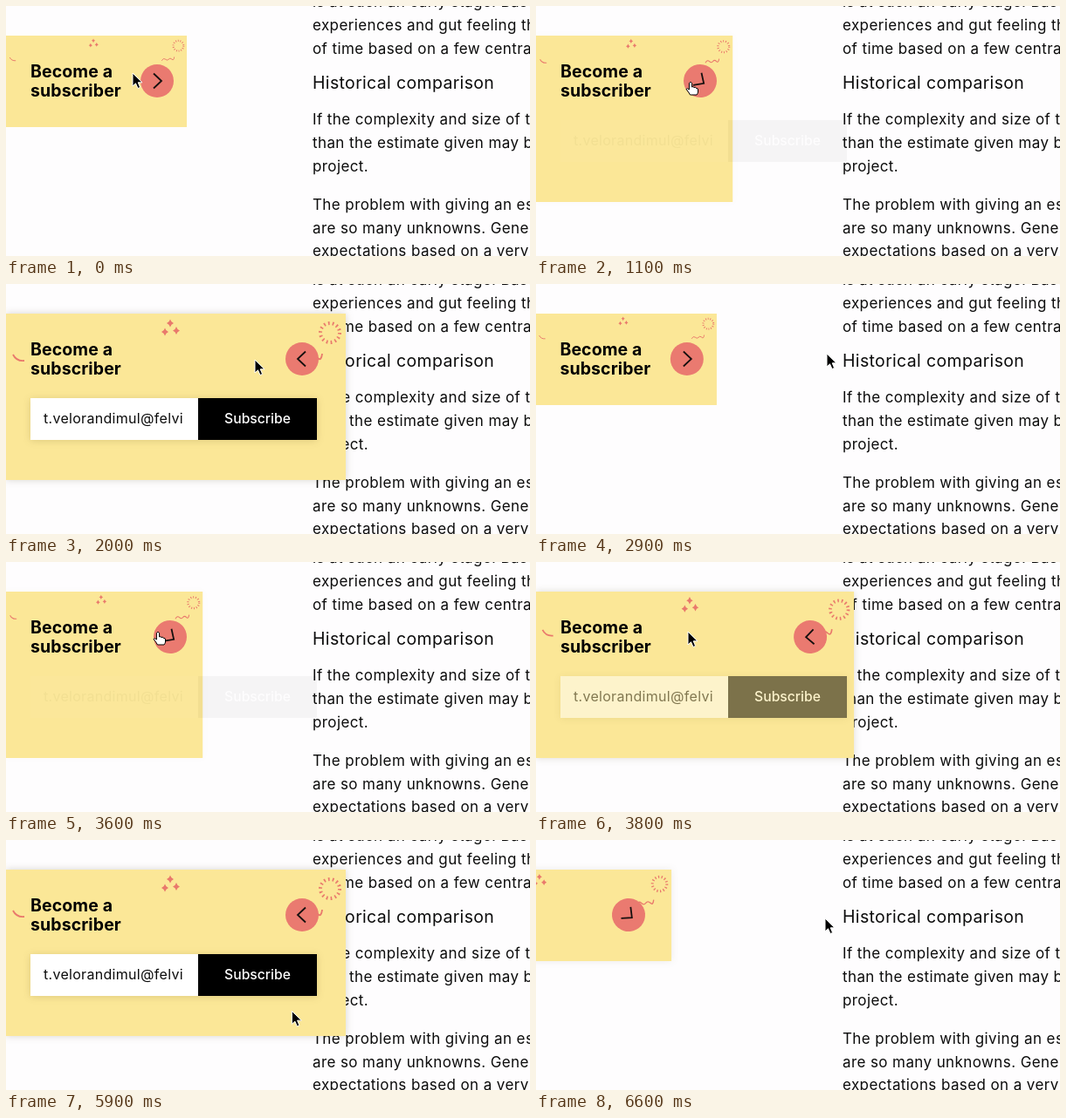
These frames come from a looping animation (600x287 px, 6700 ms). An HTML page:

```html
<!DOCTYPE html>
<html lang="en">
<head>
<meta charset="utf-8">
<title>Subscribe card</title>
<style>
  html, body { margin: 0; width: 100%; height: 100%; overflow: hidden; background: #fefdfe; }
  svg { display: block; width: 100%; height: 100%; }
  text { font-family: Inter, "Open Sans", sans-serif; fill: #0c0c0c; }
  .body { font-size: 17px; letter-spacing: .4px; }
  .heading { font-size: 19.5px; letter-spacing: .35px; }
  .title { font-size: 19.5px; font-weight: 700; letter-spacing: .1px; fill: #000; }
  .email { font-size: 16px; letter-spacing: .3px; }
  .label { font-size: 15.7px; font-weight: 500; fill: #fff; }
  .deco { fill: none; stroke: #e9796c; stroke-width: 1.8; }
  .form { filter: drop-shadow(0 1px 4px rgba(70, 55, 0, .16)); }
</style>
</head>
<body>
<svg viewBox="0 0 600 287">
  <defs><clipPath id="field"><rect x="28" y="131" width="176" height="48"/></clipPath></defs>
  <g id="article"></g>

  <g id="card">
    <rect id="panel" y="34" fill="#fbe797"/>
    <g id="deco" class="deco">
      <path d="M8 47Q12 55 21 54"/>
      <path d="M335 54q4-7 8-3t7 0t7 0t5-5"/>
      <circle cx="371" cy="22" r="11" stroke-width="4" stroke-dasharray="1.7 3.237"/>
      <g id="stars" fill="#e9796c" stroke="none"></g>
    </g>
    <text class="title" x="28" y="82">Become a</text>
    <text class="title" x="28" y="104">subscriber</text>
    <g id="form" class="form">
      <rect x="28" y="131" width="192" height="48" fill="#fff"/>
      <text class="email" x="43" y="160" clip-path="url(#field)">t.velorandimul@felvi</text>
      <rect id="button" x="220" y="131" width="136" height="48"/>
      <text class="label" x="288" y="160" text-anchor="middle">Subscribe</text>
    </g>
    <g id="toggle">
      <circle r="19" fill="#ea7a70"/>
      <path d="M-4-8.5L5 0L-4 8.5" fill="none" stroke="#16100f" stroke-width="1.8"/>
    </g>
  </g>

  <g id="cursor">
    <path id="arrow" d="M0 0V15L3.5 11.8L6 17.5L8.6 16.4L6.2 10.8H11Z" stroke="#fff" stroke-width="1"/>
    <path id="hand" d="M-1.6 1.5Q0-1 1.6 1.5V6Q3 5 4 6.5Q6 5.5 6.5 7.5Q8.5 7 8.5 9V12Q8 14 7 15H-.5Q-2 12-5 8.5Q-4 6.5-1.6 9Z"
      fill="#fff" stroke="#000" stroke-width="1"/>
  </g>
</svg>
<script>
const LOOP = 6700, STEP = 100;
const CLOSED = 207, OPEN = 389, TOP = 34;
const $ = id => document.getElementById(id);
const set = (id, attrs) => {
  for (const name in attrs) $(id).setAttribute(name, attrs[name]);
};

const article = [
  [.5, 'is at such an early stage. Based on'],
  [27.5, 'experiences and gut feeling the'],
  [54.5, 'of time based on a few central'],
  [95, 'Historical comparison', 'heading'],
  [136, 'If the complexity and size of the'],
  [163, 'than the estimate given may be'],
  [189.5, 'project.'],
  [233.5, 'The problem with giving an estimate'],
  [260.5, 'are so many unknowns. Generally'],
  [287, 'expectations based on a very']
];
$('article').innerHTML = article.map(([y, line, style = 'body']) =>
  `<text class="${style}" x="351" y="${y}">${line}</text>`).join('');

$('stars').innerHTML = [[188, 11], [182, 21], [195, 19.5]].map(([x, y]) =>
  `<path transform="translate(${x} ${y})" d="M0-4.5Q1-1 4 0Q1 1 0 4.5Q-1 1-4 0Q-1-1 0-4.5"/>`).join('');

// Clicks on the toggle: time and resulting state
const toggles = [[-LOOP, false], [1100, true], [2500, false], [3600, true], [6500, false]];
const slideEase = [.1, .53, .863, .956, .997, 1];
const formFade = [.03, .25, .5, .69, .86, .96, 1];
const at = (curve, k) => curve[Math.min(k, curve.length - 1)];

// Pointer path: time, x, y
const pointer = [
  [0, 145, 77], [100, 155, 78], [300, 171, 79], [500, 171, 79], [700, 177, 87],
  [1700, 177, 87], [1800, 205, 88], [2000, 285, 87], [2200, 322, 83], [2400, 333, 80],
  [3100, 333, 80], [3200, 300, 82], [3300, 215, 81], [3400, 174, 80],
  [4200, 174, 80], [4300, 190, 88], [4500, 255, 128], [4700, 293, 157], [4800, 298, 161],
  [5100, 298, 161], [5200, 305, 180], [5400, 325, 231],
  [5700, 325, 231], [5800, 326, 222], [6100, 330, 145], [6400, 331, 90], [LOOP, 331, 90]
];
function pointerAt(t) {
  const i = pointer.findIndex(p => p[0] > t);
  const [t0, x0, y0] = pointer[i - 1], [t1, x1, y1] = pointer[i];
  const f = (t - t0) / (t1 - t0);
  return [x0 + (x1 - x0) * f, y0 + (y1 - y0) * f];
}

function draw(t) {
  const [start, open] = toggles.findLast(c => c[0] <= t);
  const k = Math.round((t - start) / STEP);
  const p = at(slideEase, k);
  const openness = open ? p : 1 - p;
  const width = CLOSED + (OPEN - CLOSED) * openness;
  const shift = open ? 0 : -width * (1 - p);   // the closed card slides in from the left
  const toggleX = width - 34 - 16 * Math.min(1, 2 * openness);
  const remaining = 180 * (1 - p) ** 2;

  set('card', { transform: `translate(${shift} 0)` });
  set('panel', { width, height: open ? 191 : 105 });
  $('panel').style.filter = `drop-shadow(0 0 4px rgba(60, 50, 20, ${.2 * openness}))`;
  set('deco', { transform: `translate(0 ${TOP}) scale(${width / OPEN})` });
  set('toggle', { transform: `translate(${toggleX} 86) rotate(${open ? 180 - remaining : remaining})` });
  set('form', { opacity: at(formFade, k), visibility: open ? 'visible' : 'hidden' });

  const [x, y] = pointerAt(t);
  const overButton = open && x > 220 && x < 356 && y > 131 && y < 179;
  const overToggle = Math.hypot(x - toggleX - shift, y - 86) < 19;
  const clickable = overButton || overToggle;
  set('button', { rx: overButton ? 3 : 0 });
  set('cursor', { transform: `translate(${x} ${y})` });
  set('hand', { visibility: clickable ? 'visible' : 'hidden' });
  set('arrow', { visibility: clickable ? 'hidden' : 'visible' });
}

function tick() {
  draw(Math.floor(performance.now() % LOOP / STEP) * STEP);
  requestAnimationFrame(tick);
}
tick();
</script>
</body>
</html>
```
